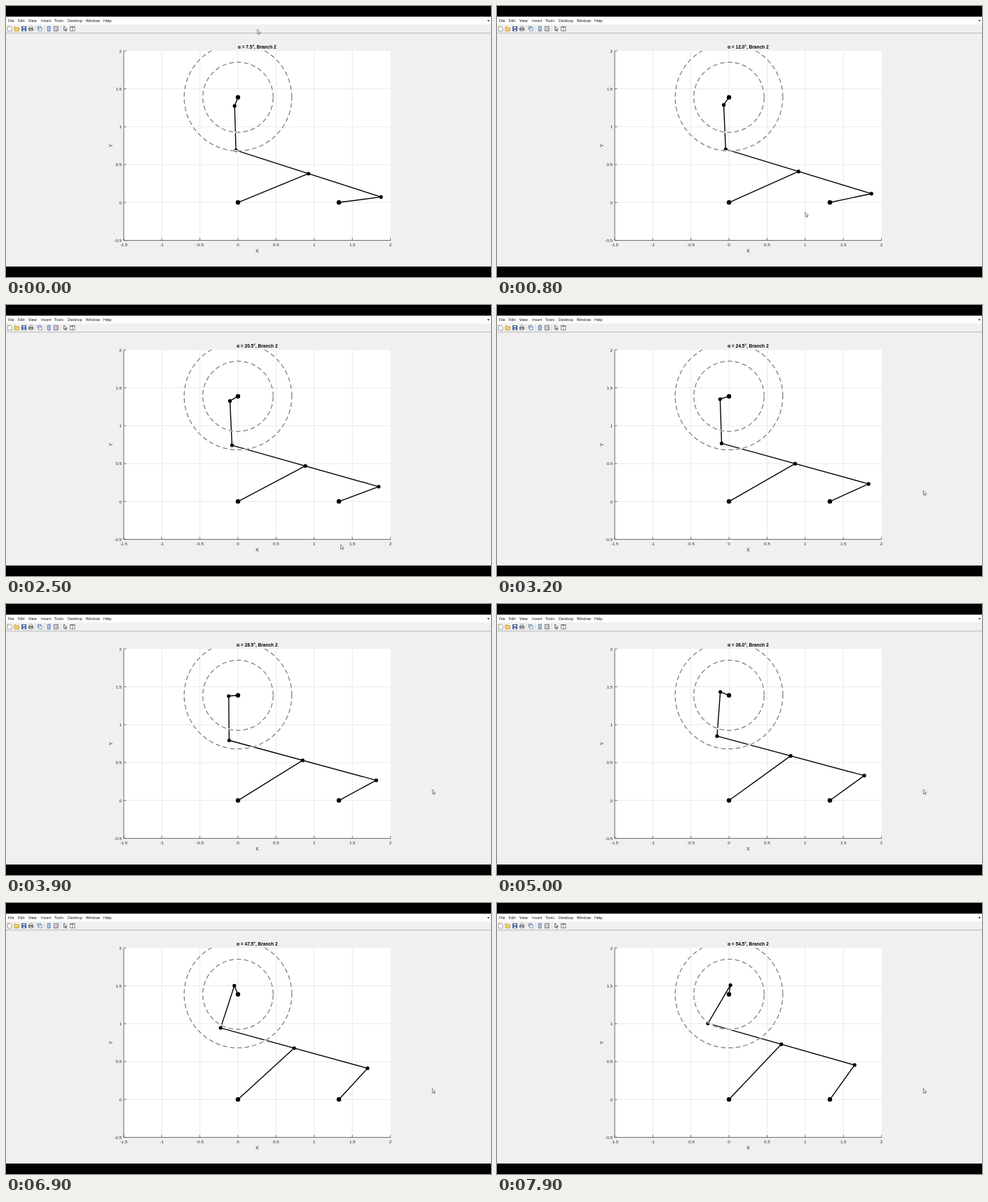
Write an HTML page that moves like this. It is 692 px wide and 388 px high and loops after 8 s.

```html
<!DOCTYPE html>
<html lang="en">
<head>
<meta charset="utf-8">
<title>Linkage motion</title>
<style>
  html, body { margin: 0; width: 100%; height: 100%; overflow: hidden; background: #000; }
  svg { display: block; width: 692px; height: 388px; }
  text { font-family: "Liberation Sans", Arial, sans-serif; fill: #262626; }
  .menu text { font: 5.4px "Open Sans", "Noto Sans", sans-serif; fill: #000; }
  .tick { font-size: 6.2px; }
  .label { font-size: 7px; text-anchor: middle; }
  .title { font-size: 6.55px; font-weight: bold; text-anchor: middle; fill: #000; }
  .ring { fill: none; stroke: #7b7b7b; stroke-width: 1.25; stroke-dasharray: 6.6 4; }
  .halo { fill: none; stroke: #fff; stroke-width: 2; }
  .link { fill: none; stroke: #000; stroke-width: 1.4; stroke-linejoin: round; }
</style>
</head>
<body>
<svg id="stage" viewBox="0 0 692 388" xmlns="http://www.w3.org/2000/svg">
  <defs><clipPath id="plot"><rect x="168" y="64.3" width="381" height="271.4"/></clipPath></defs>
  <rect width="692" height="388" fill="#000"/>
  <rect y="15.5" width="692" height="357.5" fill="#f0f0f0"/>
  <rect y="15.5" width="692" height="10.8" fill="#fdfdfd"/>
  <path d="M0 38.8H692" stroke="#a9a9a9" stroke-width=".8"/>
  <path d="M686.6 20.3h3.4l-1.7 2.2z" fill="#222"/>
  <g class="menu" id="menu"></g>
  <g id="tools" stroke-width=".7">
    <path d="M2.3 29.2h4l1.8 1.8v5h-5.800z" fill="#fff" stroke="#6d7f99"/>
    <circle cx="2.8" cy="29.8" r="1" fill="#e4a33a"/>
    <path d="M12 30h2.500l1 1h3v4.800h-6.500z" fill="#f4cf62" stroke="#b58a2a"/>
    <rect x="22.7" y="29.600" width="6" height="6.200" fill="#4763b5" stroke="#2d3f82"/>
    <path d="M24 30h3.400v2H24zM24.300 33.800h2.800v2h-2.800z" fill="#e8edf8"/>
    <path d="M33.800 29h3.600v3h-3.600z" fill="#fff" stroke="#777"/>
    <path d="M32.300 31.700h6.400v3.300h-6.400z" fill="#999" stroke="#555"/>
    <path d="M34 34h3v2h-3z" fill="#eee" stroke="#666" stroke-width=".5"/>
    <path d="M41.500 28v9M54.700 28v9M78 28v9" stroke="#cfcfcf"/>
    <path d="M45 29.400h5v4h-5z" fill="#c9d7ea" stroke="#566f94"/>
    <path d="M46.700 31.600h4.600v4h-4.600z" fill="#fff" stroke="#566f94"/>
    <path d="M59.300 29.200h3.800v6.800h-3.800z" fill="#a9c8ee" stroke="#41618f"/>
    <path d="M68.300 29.300h6v6.500h-6z" fill="#fff" stroke="#3c4260"/>
    <path d="M69.300 31h1.500M69.300 32.700h1.500M69.300 34.300h1.500" stroke="#c34"/>
    <path d="M71.500 31h2M71.500 32.700h2M71.500 34.300h2" stroke="#345"/>
    <path d="M82.700 28.900v6.200l1.500-1.300 1 2.400 1-.5-1-2.200h1.900z" fill="#fff" stroke="#222"/>
    <path d="M91.500 29.500h6.500v6.200h-6.500z" fill="#fff" stroke="#555"/>
    <path d="M91.500 30.300h6.500M94.600 30v5.700" stroke="#555"/>
  </g>
  <rect x="168" y="64.3" width="380.700" height="271.300" fill="#fff"/>
  <g id="axes"></g>
  <text class="title" id="title" x="358.3" y="61.100"></text>
  <text class="label" x="358.3" y="352.9">X</text>
  <text class="label" transform="translate(151.600 199.800) rotate(-90)">Y</text>
  <g clip-path="url(#plot)">
    <path class="link" id="links"/>
    <g id="joints"></g>
    <g id="rings"></g>
  </g>
  <path id="cursor" d="M0 0V6.400L1.500 5 2.500 7.300 3.400 6.900 2.500 4.700H4.500Z" fill="#fff" stroke="#333" stroke-width=".6"/>
  <rect y="373" width="692" height="15" fill="#000"/>
</svg>
<script>
const $ = id => document.getElementById(id);
const add = (parent, tag, attrs, text) => {
  const el = document.createElementNS('http://www.w3.org/2000/svg', tag);
  for (const key in attrs) el.setAttribute(key, attrs[key]);
  if (text) el.textContent = text;
  return parent.appendChild(el);
};

// Linkage dimensions in stage pixels
const UNIT = 108.7;
const BASE = [331, 281.3], PIVOT = [475, 281.3], HUB = [331, 130.7];
const CRANK = 60.6, ARM = 108.75, SHORT = 13.3, ROD = 63.5;
const LOOP = 8000, STEP = 100;
const HOLDS = [10, 42, 62];

// [picture step, angle in degrees]
const ANGLES = [[0, 7.5], [14, 15], [24, 20.5], [38, 28.5], [48, 36], [57, 41.5], [76, 54.5]];
// [ms, x, y]
const POINTER = [
  [0, 358.7, 33.5], [900, 450, 328], [1000, 450, 328], [1300, 462, 375],
  [1900, 472, 375], [2000, 472, 361], [2500, 477.600, 343], [2800, 520, 283], [3200, 608.3, 265.6]
];

function sample(keys, at, col) {
  const i = keys.findIndex(key => key[0] > at);
  if (i < 0) return keys[keys.length - 1][col];
  const a = keys[i - 1], b = keys[i];
  return a[col] + (b[col] - a[col]) * (at - a[0]) / (b[0] - a[0]);
}

// Joint at distance r from p and s from q, on the left of p to q as seen on screen
function meet(p, q, r, s) {
  const dx = q[0] - p[0], dy = q[1] - p[1], d = Math.hypot(dx, dy);
  const along = (d * d + r * r - s * s) / (2 * d);
  const side = Math.sqrt(Math.max(0, r * r - along * along));
  return [p[0] + (dx * along + dy * side) / d, p[1] + (dy * along - dx * side) / d];
}

const names = { File: 3, Edit: 17, View: 32, Insert: 50, Tools: 69, Desktop: 88, Window: 113.7, Help: 139 };
for (const name in names) add($('menu'), 'text', { x: names[name], y: 23.400 }, name);

const line = (d, stroke, width) => add($('axes'), 'path', { d, stroke, 'stroke-width': width });
for (let v = -1.5; v <= 2; v += 0.5) {
  const x = BASE[0] + v * UNIT * 1.0008;
  if (v > -1.5 && v < 2) line(`M${x} 64.300V335.600`, '#e4e4e4', .8);
  line(`M${x} 335.600v-3.600`, '#444', .7);
  add($('axes'), 'text', { class: 'tick', x, y: 344.300, 'text-anchor': 'middle' }, String(v));
}
for (let v = -0.5; v <= 2; v += 0.5) {
  const y = BASE[1] - v * 108.5;
  if (v > -0.5 && v < 2) line(`M168 ${y}H548.700`, '#e4e4e4', .8);
  line(`M168 ${y}h3.600`, '#444', .7);
  add($('axes'), 'text', { class: 'tick', x: 165, y: y + 2.2, 'text-anchor': 'end' }, String(v));
}
line('M168 64.300V335.600H548.700', '#444', .8);
$('axes').lastChild.setAttribute('fill', 'none');

for (const r of [ROD + SHORT, ROD - SHORT]) {
  const [x, y] = HUB;
  const d = `M${x + r} ${y}A${r} ${r} 0 0 0 ${x - r} ${y}A${r} ${r} 0 0 0 ${x + r} ${y}`;
  add($('rings'), 'path', { class: 'halo', d });
  add($('rings'), 'path', { class: 'ring', d });
}

for (const [cx, cy] of [BASE, PIVOT, HUB]) add($('joints'), 'circle', { cx, cy, r: 3.2 });
const dots = [0, 1, 2, 3].map(() => add($('joints'), 'circle', { r: 2.6 }));

function draw(ms) {
  const tick = Math.floor(ms / STEP);
  const step = tick - HOLDS.filter(h => h <= tick).length;
  const angle = Math.round(sample(ANGLES, step, 1) * 2) / 2;
  const rad = angle * Math.PI / 180;

  const a = [PIVOT[0] + CRANK * Math.cos(rad), PIVOT[1] - CRANK * Math.sin(rad)];
  const b = meet(BASE, a, ARM, ARM);
  const c = [2 * b[0] - a[0], 2 * b[1] - a[1]];
  const d = meet(c, HUB, ROD, SHORT);

  $('links').setAttribute('d', `M${PIVOT}L${a}L${c}L${d}L${HUB}M${BASE}L${b}`);
  [a, b, c, d].forEach(([x, y], i) => {
    dots[i].setAttribute('cx', x);
    dots[i].setAttribute('cy', y);
  });
  $('title').textContent = `α = ${angle.toFixed(1)}°, Branch 2`;

  const at = tick * STEP;
  $('cursor').setAttribute('transform', `translate(${sample(POINTER, at, 1)} ${sample(POINTER, at, 2)})`);
}

const start = performance.now();
function frame() {
  draw((performance.now() - start) % LOOP);
  requestAnimationFrame(frame);
}
draw(0);
requestAnimationFrame(frame);
</script>
</body>
</html>
```
